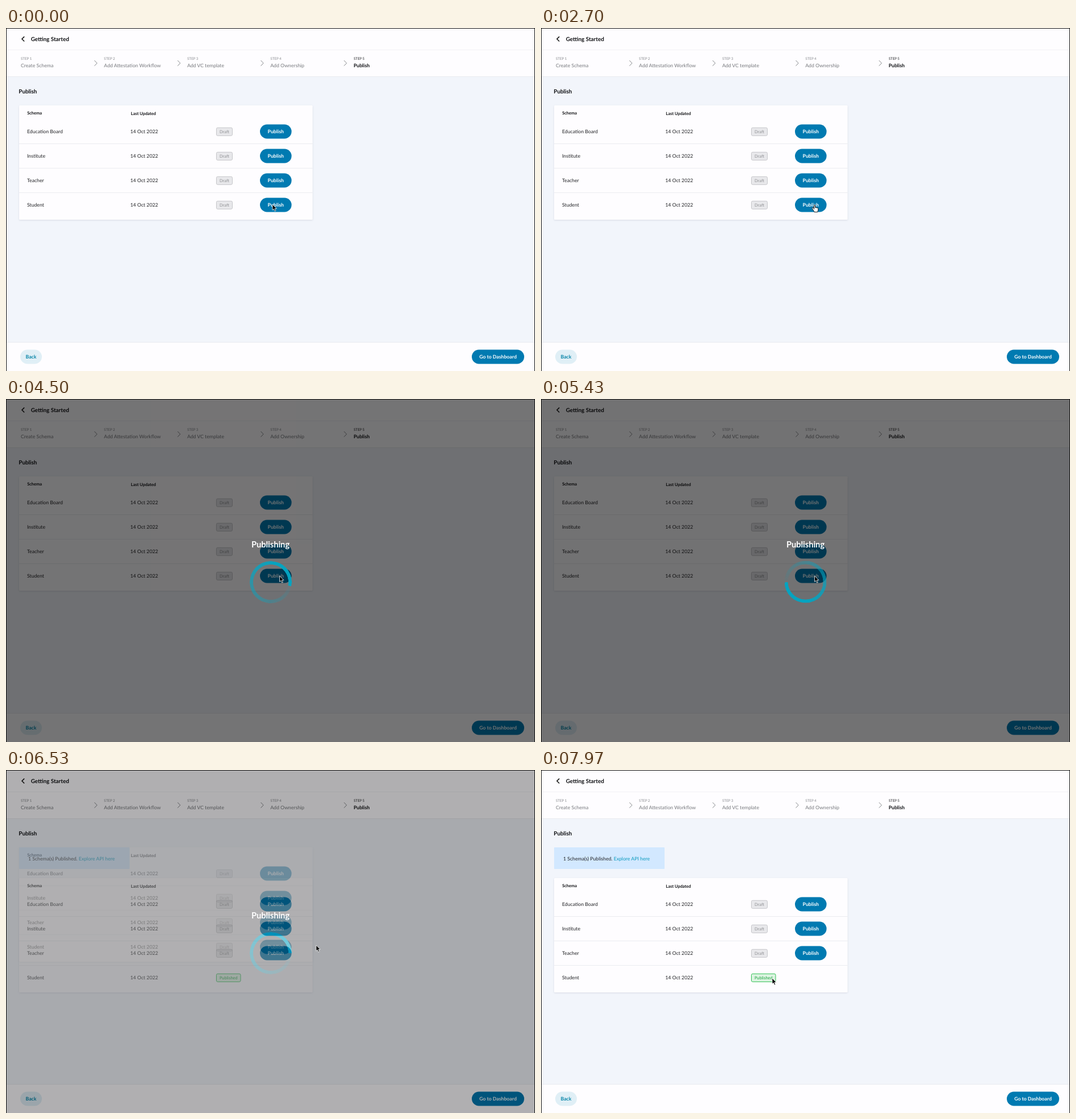
An HTML page for the animation above (8000 ms loop, 929 by 603 pixels).

```html
<!DOCTYPE html>
<html lang="en">
<head>
<meta charset="utf-8">
<title>Publish schema</title>
<style>
html, body { margin: 0; width: 100%; height: 100%; overflow: hidden; background: #f2f5fa; }
svg, #veil { position: absolute; left: 0; top: 0; width: 929px; height: 603px; }
svg { font: 8.7px Lato, sans-serif; text-rendering: geometricPrecision; }
#veil { background: rgba(0, 0, 0, .55); }
#veil p {
  position: absolute; left: 0; width: 929px; top: 247px; margin: 0; text-align: center;
  font: bold 14.6px/18px Lato, sans-serif; color: #fff;
}
#ring {
  position: absolute; left: 427.5px; top: 285px; width: 73.5px; height: 73.5px; border-radius: 50%;
  background: conic-gradient(from 90deg, rgba(5, 163, 192, .04), #05a3c0 75%);
  -webkit-mask: radial-gradient(closest-side, #0000 83%, #000 84.5%);
  mask: radial-gradient(closest-side, #0000 83%, #000 84.5%);
}
.card { filter: drop-shadow(0 1px 1.5px rgba(40, 50, 80, .13)); }
</style>
</head>
<body>
<svg id="before"></svg>
<div id="veil"><p>Publishing</p><div id="ring"></div></div>
<svg id="after"></svg>
<svg id="pointer">
  <path d="M.5 0H928.5V603M.5 0V603M0 .5H929" fill="none" stroke="#111"/>
  <g id="cursor">
    <path id="arrow" d="M0 0V10.2L2.3 8.1 4 12 5.8 11.2 4.1 7.4H7.3Z" fill="#000" stroke="#fff" stroke-width=".8" stroke-linejoin="round"/>
    <path id="hand" d="M-1 1C-1-.3 1-.3 1 1V5C1.2 4 2.7 4.1 2.8 5.2 3.2 4.4 4.5 4.6 4.6 5.6 5.2 5 6.2 5.4 6.2 6.4V9C6.2 10.4 5.2 11 5.2 12.6H-.6C-.8 10.6-2.4 9.6-3.6 7.6-4.2 6.4-3-.2-1 7.4Z" fill="#fff" stroke="#111" stroke-width=".9" stroke-linejoin="round"/>
  </g>
</svg>
<script>
const $ = id => document.getElementById(id);
const BLUE = '#007ab1', INK = '#222326';

const box = (x, y, w, h, fill, rx = 0, extra = '') =>
  `<rect x="${x}" y="${y}" width="${w}" height="${h}" rx="${rx}" fill="${fill}" ${extra}/>`;
const text = (x, y, s, fill = INK, extra = '') =>
  `<text x="${x}" y="${y}" fill="${fill}" ${extra}>${s}</text>`;
const bold = (x, y, s, size, fill = '#101114') =>
  text(x, y, s, fill, `font-weight="700" font-size="${size}"`);
const line = (x, y, w, color) => box(x, y, w, 1, color);
const chevron = (x, y, w, h, color, weight) =>
  `<path d="M${x} ${y - h}l${w} ${h}l${-w} ${h}" fill="none" stroke="${color}" stroke-width="${weight}"/>`;

const button = (x, y, w, label, fill = BLUE, color = '#fff') =>
  box(x, y - 12.4, w, 24.8, fill, 12.4) +
  text(x + w / 2, y + 3.1, label, color, 'font-weight="700" text-anchor="middle"');

const badge = (y, w, label, fill, stroke, color) =>
  box(369.5, y - 6.7, w, 14, fill, 2.2, `stroke="${stroke}"`) +
  text(369.5 + w / 2, y + 3.1, label, color, 'font-size="7.44" text-anchor="middle"');

function steps() {
  const names = ['Create Schema', 'Add Attestation Workflow', 'Add VC template', 'Add Ownership', 'Publish'];
  return names.map((name, i) => {
    const x = 26 + 146.1 * i, last = i === 4;
    return text(x, 55.6, 'STEP ' + (i + 1), last ? INK : '#85878b', 'font-size="6.2"') +
      (last ? bold(x, 68.6, name, 8.7)
            : text(x, 68.6, name, '#77797d') + chevron(x + 129.3, 61.8, 4.6, 4.8, '#85878b', 1));
  }).join('');
}

function table(top, published) {
  let s = `<g class="card">${box(23, top, 515.5, 201, '#fefdff', 1.5)}</g>` +
    bold(37.2, top + 16, 'Schema', 7.44) + bold(219.3, top + 16.6, 'Last Updated', 7.44);
  ['Education Board', 'Institute', 'Teacher', 'Student'].forEach((name, i) => {
    const y = top + 46 + 43 * i, done = published && i === 3;
    s += text(37, y + 3.1, name) + text(218.2, y + 3.1, '14 Oct 2022');
    s += done ? badge(y, 42.5, 'Published', '#dcf4e1', '#2fc052', '#1ea440')
              : badge(y, 28, 'Draft', '#e8e8eb', '#c6c6ca', '#8f9094') + button(446, y, 55.5, 'Publish');
    if (i < 3) s += line(23, y + 21, 515.5, '#ebecf0');
  });
  return s;
}

function scene(published) {
  return box(0, 0, 929, 603, '#f2f5fb') + box(0, 0, 929, 86, '#fefdff') +
    line(0, 38, 929, '#f1f1f5') + line(0, 85, 929, '#e8eaef') +
    chevron(32.2, 19.3, -4.2, 4.2, '#111', 1.5) + bold(43.7, 23, 'Getting Started', 9.9) +
    steps() + bold(22.3, 114.6, 'Publish', 9.9) +
    (published
      ? box(23, 136, 194, 38, '#d2e8ff', 1) +
        text(39, 158.9, '1 Schema(s) Published. <tspan fill="#0a9abf">Explore API here</tspan>')
      : '') +
    table(published ? 190 : 136, published) +
    box(0, 552, 929, 51, '#fefdff') + line(0, 552, 929, '#e8eaef') +
    button(25, 578, 38, 'Back', '#e0eff6', '#0784a8') + button(818, 578, 92, 'Go to Dashboard');
}

$('before').innerHTML = scene(false);
$('after').innerHTML = scene(true);

// Pointer stops: time, x, y
const path = [
  [0, 468, 310], [1660, 468, 310], [2400, 480.5, 311], [6200, 480.5, 311], [6470, 528.5, 306.5],
  [6530, 544.5, 308], [6680, 565, 315], [6900, 560, 328], [7300, 520, 355], [7600, 482, 364],
  [7850, 410, 367], [7940, 406, 366], [8000, 406, 366]
];
const unit = v => Math.min(1, Math.max(0, v));
const easeOut = v => 1 - (1 - unit(v)) ** 2;

function draw(t) {
  const i = path.findIndex(p => p[0] > t), a = path[i - 1], b = path[i];
  const k = (t - a[0]) / (b[0] - a[0]);
  const hand = t >= 1850 && t < 4300;
  $('cursor').setAttribute('transform', `translate(${a[1] + (b[1] - a[1]) * k} ${a[2] + (b[2] - a[2]) * k})`);
  $('arrow').style.display = hand ? 'none' : '';
  $('hand').style.display = hand ? '' : 'none';
  $('veil').style.opacity = easeOut((t - 4270) / 260);
  $('ring').style.transform = `rotate(${360 * unit((t - 4440) / 2000)}deg)`;
  $('after').style.opacity = easeOut((t - 6452) / 310);
}

const start = performance.now();
function tick() {
  draw((performance.now() - start) % 8000);
  requestAnimationFrame(tick);
}
draw(0);
tick();
</script>
</body>
</html>
```
